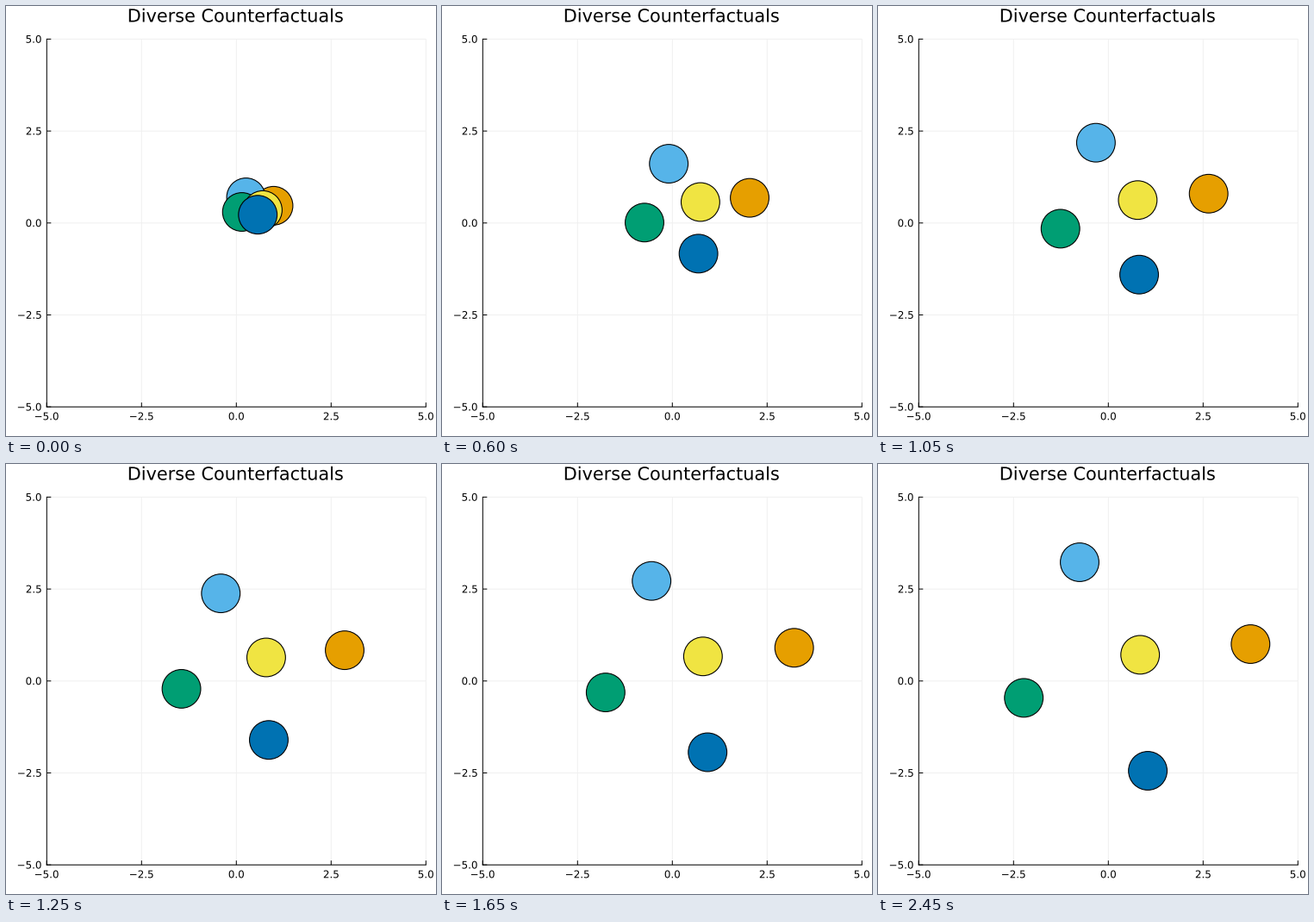
Recreate the animation shown at these times as a matplotlib script. Size 499 by 499 pixels, loop 2500 ms.

```python
import numpy as np
import matplotlib.pyplot as plt
from matplotlib.animation import FuncAnimation
from matplotlib.patches import Circle, PathPatch
from matplotlib.textpath import TextPath
from matplotlib.transforms import Affine2D

SIZE, DPI = 499, 64
FRAMES, INTERVAL = 50, 50
PX = 72 / DPI  # points per pixel
RADIUS = 22.4
LEFT, RIGHT, TOP, BOTTOM = 47.3, 487.3, 38.4, 465.2

plt.rcParams["font.family"] = "DejaVu Sans"

fig = plt.figure(figsize=(SIZE / DPI, SIZE / DPI), dpi=DPI, facecolor="white")
ax = fig.add_axes([0, 0, 1, 1])
ax.set_xlim(0, SIZE)
ax.set_ylim(SIZE, 0)
ax.axis("off")


def line(x0, y0, x1, y1, color="black", z=2):
    ax.plot([x0, x1], [y0, y1], color=color, lw=PX, zorder=z,
            solid_capstyle="butt", snap=False)


def label(x, y, text, size, align=0.5):
    """Outlined text on baseline y; align 0.5 centres it, 1 ends it at x."""
    path = TextPath((0, 0), text, size=size)
    box = path.get_extents()
    flip = Affine2D().translate(-box.x0 - align * box.width, 0).scale(1, -1)
    ax.add_patch(PathPatch(path, fc="black", lw=0, snap=False,
                           transform=flip.translate(x, y) + ax.transData))


for value in np.linspace(-5, 5, 5):
    part = (value + 5) / 10
    x = LEFT + part * (RIGHT - LEFT)
    y = BOTTOM - part * (BOTTOM - TOP)
    text = f"{value:.1f}".replace("-", "\u2212")
    line(x, TOP, x, BOTTOM, "#F0F0F0", 1)
    line(LEFT, y, RIGHT, y, "#F0F0F0", 1)
    line(x, BOTTOM, x, BOTTOM - 5)
    line(LEFT, y, LEFT + 5, y)
    label(x, 480.3, text, 11.9)
    label(40.7, y + 4.3, text, 11.9, align=1)

line(LEFT, TOP - 0.5, LEFT, BOTTOM + 0.5)
line(LEFT - 0.5, BOTTOM, RIGHT + 0.5, BOTTOM)
label(266.8, 18.5, "Diverse Counterfactuals", 20.8)

# Colour, start, end and early sideways bend of each disc, back to front
DISCS = [
    ("#E69F00", (310.5, 231.8), (432.3, 209.0), (1.7, -1.1)),
    ("#56B4E9", (278.5, 222.0), (234.0, 114.0), (2.2, 2.4)),
    ("#009E73", (273.7, 239.0), (169.2, 271.4), (0.6, 0.3)),
    ("#F0E442", (298.0, 236.8), (304.2, 221.4), (-0.7, -6.0)),
    ("#0072B2", (292.2, 242.2), (313.1, 356.0), (-4.0, 4.4)),
]


def spread(t):
    """Short run-up, then a long slowdown, from 0 to 1."""
    run_up = 1 - np.exp(-(t / 0.15) ** 2)
    return t + t * (1 - t) * (0.84 - 0.37 * t) * run_up


def position(start, end, bend, t):
    s = spread(t)
    push = (1 - s) * (1 - np.exp(-8 * s))
    start, end, bend = map(np.array, (start, end, bend))
    return start + (end - start) * s + bend * push


circles = [
    ax.add_patch(Circle(start, RADIUS, fc=color, ec="black",
                        lw=1.1 * PX, zorder=3 + i))
    for i, (color, start, _, _) in enumerate(DISCS)
]


def update(frame):
    t = frame / (FRAMES - 1)
    for circle, (_, *route) in zip(circles, DISCS):
        circle.center = position(*route, t)
    return circles


anim = FuncAnimation(fig, update, frames=FRAMES, interval=INTERVAL,
                     repeat=True, repeat_delay=0, blit=False)
plt.show()
```
